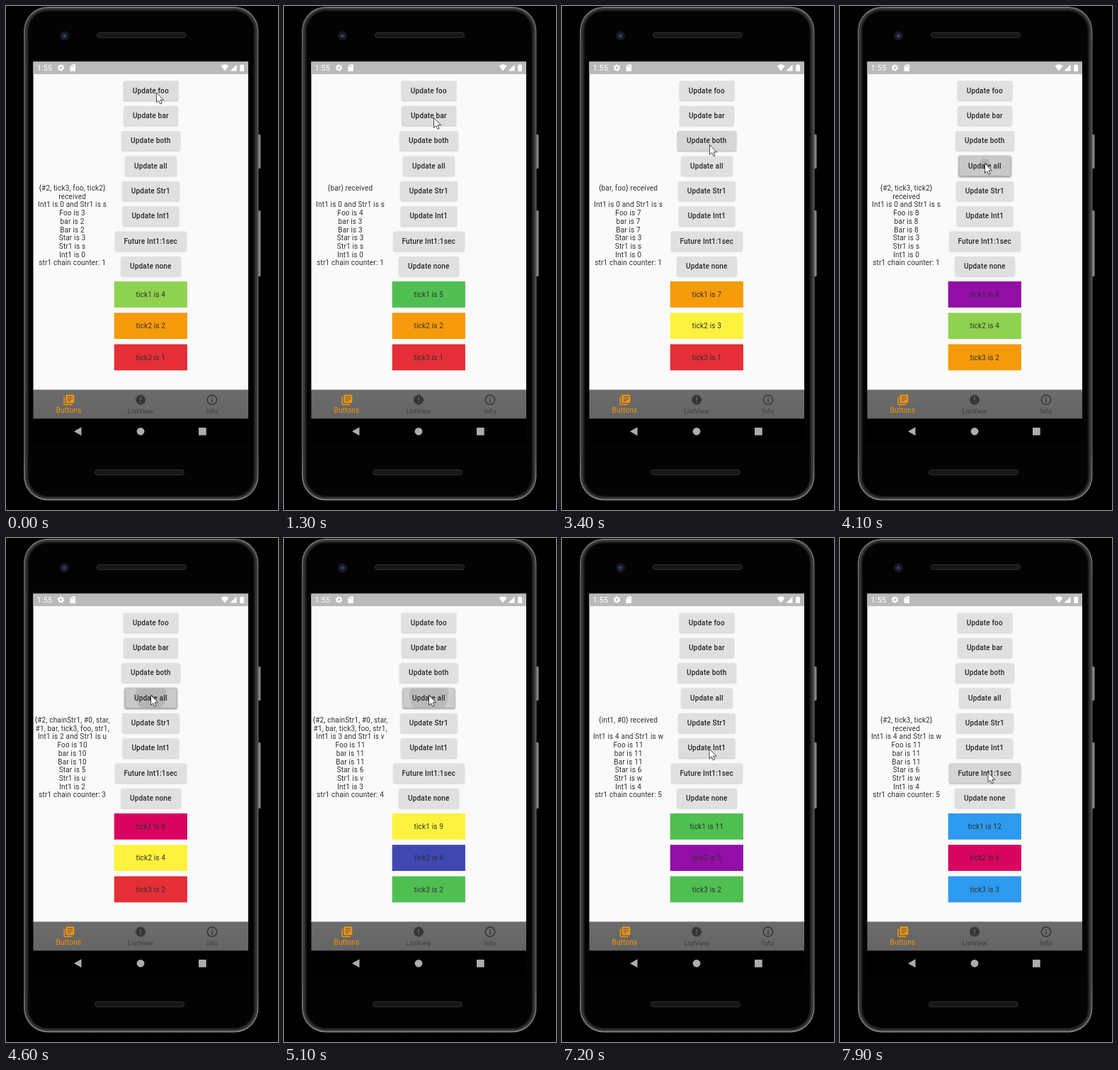
An HTML page for the animation above (8000 ms loop, 384 by 710 pixels).

```html
<!DOCTYPE html>
<html lang="en">
<head>
<meta charset="utf-8">
<title>Update buttons demo</title>
<style>
html, body { margin: 0; width: 100%; height: 100%; overflow: hidden; background: #000; }
svg { display: block; }
text { font: 10px Roboto, sans-serif; letter-spacing: .18px; text-anchor: middle; fill: #303030; }
.label { font-weight: 500; fill: #282828; }
</style>
</head>
<body>
<svg id="stage" width="384" height="710" viewBox="0 0 384 710">
  <defs>
    <linearGradient id="rim" x2="0" y2="1">
      <stop offset="0" stop-color="#707070"/><stop offset=".08" stop-color="#565656"/>
      <stop offset=".9" stop-color="#565656"/><stop offset="1" stop-color="#7c7c7c"/>
    </linearGradient>
    <linearGradient id="tabs" x2="0" y2="1">
      <stop offset="0" stop-color="#6c6c6c"/><stop offset="1" stop-color="#646464"/>
    </linearGradient>
    <radialGradient id="lens">
      <stop offset="0" stop-color="#4a5688"/><stop offset=".4" stop-color="#20263f"/><stop offset="1" stop-color="#0c0d12"/>
    </radialGradient>
    <filter id="soft" x="-20%" y="-40%" width="140%" height="190%"><feGaussianBlur stdDeviation="1"/></filter>
  </defs>
  <rect width="384" height="710" fill="#000"/>
  <g fill="#858585">
    <rect x="354" y="181" width="5.500" height="48" rx="1.500"/>
    <rect x="354" y="288" width="5.500" height="93" rx="1.500"/>
  </g>
  <rect x="25" y="1" width="331.500" height="695.500" rx="34" fill="url(#rim)"/>
  <rect x="27" y="3" width="327.500" height="691.500" rx="32" fill="#333"/>
  <rect x="30" y="5.500" width="321.500" height="686.500" rx="29" fill="#181818"/>
  <rect x="32" y="7.500" width="317.500" height="682.500" rx="27" fill="#030303"/>
  <g fill="#161616" stroke="#303030">
    <rect x="128.500" y="37.500" width="126" height="7" rx="3.500"/>
    <rect x="125.500" y="653.500" width="126" height="7" rx="3.500"/>
  </g>
  <circle cx="82.500" cy="42" r="6" fill="url(#lens)" stroke="#1c1e28"/>

  <rect x="38.500" y="78.500" width="303.500" height="463" fill="#fafafa"/>
  <rect x="38.500" y="78.500" width="303.500" height="17.500" fill="#bababa"/>
  <text x="54.500" y="91" style="font-size:11px;fill:#fff">1:55</text>
  <g fill="#fff">
    <circle cx="77.500" cy="87" r="2.700" fill="none" stroke="#fff" stroke-width="2"/>
    <circle cx="77.500" cy="87" r="4.100" fill="none" stroke="#fff" stroke-width="1.400" stroke-dasharray="2.100 2.190"/>
    <path d="M90.500 85l2.800-2.800h4.700v9.800h-7.500z"/>
    <path d="M92.500 84v2M94.200 83.400v2.600M95.900 83.400v2.600" stroke="#bababa" stroke-width=".7"/>
    <path d="M303.500 84.500q5.500-4.500 11 0l-5.500 7z"/>
    <path d="M316.500 91.500l9-9v9z"/>
    <path d="M330.300 83.300h1.500v-1.100h2.600v1.100h1.500v8.700h-5.600z"/>
  </g>

  <g id="info"></g>
  <g id="buttons"></g>
  <g id="ticks"></g>

  <rect x="38.500" y="540.500" width="303.500" height="41" fill="url(#tabs)"/>
  <g transform="translate(80 546) scale(.74)" fill="#f99200">
    <path d="M4 6H2v14q0 2 2 2h14v-2H4z"/>
    <rect x="6" y="2" width="16" height="16" rx="2"/>
    <path d="M9 6h10M9 10h10M9 14h6" stroke="#686868" stroke-width="2"/>
  </g>
  <circle cx="190" cy="554.700" r="6" fill="#343434" stroke="#343434" stroke-width="2.600" stroke-dasharray="2 1.140"/>
  <path d="M190 551v4.500M190 557v1.500" stroke="#686868" stroke-width="1.500"/>
  <circle cx="291" cy="554.700" r="6.700" fill="none" stroke="#343434" stroke-width="1.400"/>
  <path d="M291 551v1.500M291 554v4.500" stroke="#343434" stroke-width="1.500"/>
  <text x="88.500" y="573" style="fill:#f99200">Buttons</text>
  <text x="190" y="573.500" style="font-size:9px;fill:#3c3c3c">ListView</text>
  <text x="291" y="573.500" style="font-size:9px;fill:#3c3c3c">Info</text>

  <rect x="38.500" y="581.500" width="303.500" height="35" fill="#000"/>
  <g fill="#adadad">
    <path d="M96 599.300l10.500-6v12z"/>
    <circle cx="190" cy="599.300" r="5.400"/>
    <rect x="272" y="594" width="10.700" height="10.700"/>
  </g>
  <path id="cursor" d="M0 0V14L3.200 11.200 5.400 16 7.700 15 5.500 10.300H10Z" fill="#fff" stroke="#333" stroke-width=".9"/>
</svg>
<script>
const LOOP = 8000;
const $ = id => document.getElementById(id);

function add(parent, tag, attrs, text) {
  const el = document.createElementNS("http://www.w3.org/2000/svg", tag);
  for (const k in attrs) el.setAttribute(k, attrs[k]);
  if (text) el.textContent = text;
  parent.appendChild(el);
  return el;
}

const COLORS = {
  l: "#8fd24f", g: "#50bf52", b: "#2d9aef", p: "#920fa7", y: "#fdf23e",
  o: "#f59a0a", r: "#e52e37", i: "#4047b0", k: "#d8045f"
};

// Buttons: name, width
const buttons = [["foo", 77], ["bar", 76], ["both", 82], ["all", 72], ["Str1", 80],
  ["Int1", 79], ["Future Int1:1sec", 100], ["none", 84]].map(([name, w], i) => {
  const g = add($("buttons"), "g", {});
  const y = 105.7 + i * 35.35;
  const box = { x: 204.5 - w / 2, y, width: w, height: 27.4, rx: 1.5 };
  const shadow = add(g, "rect", { ...box, y: y + .8, fill: "#000", stroke: "#000", filter: "url(#soft)" });
  add(g, "rect", { ...box, fill: "#e0e0e0" });
  const shade = add(g, "rect", { ...box, fill: "#000" });
  const clip = add(g, "clipPath", { id: "clip" + i });
  add(clip, "rect", box);
  const ripple = add(g, "circle", { "clip-path": `url(#clip${i})`, fill: "#000", r: 0 });
  add(g, "text", { x: 204.3, y: y + 16.8, class: "label" }, name.length > 5 ? name : "Update " + name);
  return { box, shadow, shade, ripple };
});

const lines = Array.from({ length: 10 }, (_, i) =>
  add($("info"), "text", { x: 93.6, y: 260 + i * 11.72 }));

const ticks = [388, 432.2, 476.5].map(y => ({
  rect: add($("ticks"), "rect", { x: 152.7, y, width: 103.2, height: 36.8 }),
  text: add($("ticks"), "text", { x: 204.3, y: y + 22.2 })
}));

// Presses: button, down, up
const presses = [[0, 180, 300], [1, 880, 1000], [1, 1480, 1600], [2, 2110, 2200], [2, 2350, 2420],
  [2, 2980, 3100], [2, 3380, 3500], [3, 4040, 4180], [3, 4400, 4540], [3, 4850, 4980],
  [4, 5920, 6040], [5, 6820, 6940], [6, 7880, 8100]];

const bump = (...keys) => s => keys.forEach(k => s[k]++);
const ALL = ["{#2, chainStr1, #0, star,", "#1, bar, tick3, foo, str1,"];
const actions = [
  { run: bump("foo"), msg: ["{foo} received"] },
  { run: bump("bar"), msg: ["{bar} received"] },
  { run: bump("foo", "bar"), msg: ["{bar, foo} received"] },
  { run: bump("foo", "bar", "star", "str", "int", "chain"), msg: ALL },
  { run: bump("str", "chain"), msg: ["{chainStr1, #1, str1}", "received"] },
  { run: bump("int"), msg: ["{int1, #0} received"] }
];

// Colours of the three tiles after an event; "." keeps the present one
const allColors = ["obp", "kyr", "yig"];
const tickColors = ["g..", "by.", "o..", "plo", "r..", "lp.", "g..", "bkb"];

const events = presses.filter(p => p[0] < 6).map(([b, , up]) => ({
  t: up, ...actions[b], colors: b === 3 ? allColors.shift() : "..."
}));
tickColors.forEach((colors, i) => {
  const n = i + 5;
  const msg = n % 4 === 0 ? ["{#2, tick3, tick2}", "received"]
    : [n % 2 ? "{#2} received" : "{#2, tick2} received"];
  events.push({ t: 800 + i * 1000, run: bump("tick"), msg, colors });
});
events.sort((a, b) => a.t - b.t);

function stateAt(t) {
  const s = { foo: 3, bar: 2, star: 3, str: 0, int: 0, chain: 1, tick: 4,
    msg: ["{#2, tick3, foo, tick2}", "received"], colors: ["l", "o", "r"] };
  for (const e of events) {
    if (e.t > t) break;
    e.run(s);
    s.msg = e.msg;
    s.colors = s.colors.map((c, i) => e.colors[i] === "." ? c : e.colors[i]);
  }
  return s;
}

// Pointer stops: time, x, y
const path = [[0, 212.5, 122], [400, 212.5, 122], [800, 211.5, 157.5], [1880, 211.5, 157.5],
  [2200, 208.5, 195.5], [3580, 208.5, 195.5], [3900, 204.5, 221.5], [5200, 204.5, 221.5],
  [5650, 207, 262], [6250, 207, 262], [6500, 207.5, 279.5], [6720, 208, 297],
  [7200, 208, 297], [7650, 209, 330], [8000, 209, 330]];

const clamp = v => Math.max(0, Math.min(1, v));

function pointerAt(t) {
  const i = path.findIndex(p => p[0] > t);
  const [t0, x0, y0] = path[i - 1], [t1, x1, y1] = path[i];
  const u = (t - t0) / (t1 - t0), e = u * u * (3 - 2 * u);
  return [x0 + (x1 - x0) * e, y0 + (y1 - y0) * e];
}

function drawButtons(t, x, y) {
  buttons.forEach((b, i) => {
    const over = x > b.box.x && x < b.box.x + b.box.width && y > b.box.y && y < b.box.y + 27.4;
    let glow = 0, radius = 0;
    for (const [n, down, up] of presses) {
      if (n !== i || t < down) continue;
      glow = clamp((t - down) / 60) * clamp(1 - (t - up - 100) / 150);
      radius = Math.min(60, (t - down) * .11);
    }
    b.shade.setAttribute("opacity", (over ? .012 : 0) + glow * .09);
    b.shadow.setAttribute("opacity", .2 + (over ? .05 : 0) + glow * .15);
    b.shadow.setAttribute("stroke-width", glow * 2.5);
    b.ripple.setAttribute("r", glow ? radius : 0);
    b.ripple.setAttribute("opacity", glow * .1);
    b.ripple.setAttribute("cx", x);
    b.ripple.setAttribute("cy", y);
  });
}

function draw(t) {
  const s = stateAt(t);
  const str = "stuvw"[s.str];
  [s.msg[0], s.msg[1] || "", `Int1 is ${s.int} and Str1 is ${str}`, `Foo is ${s.foo}`,
    `bar is ${s.bar}`, `Bar is ${s.bar}`, `Star is ${s.star}`, `Str1 is ${str}`,
    `Int1 is ${s.int}`, `str1 chain counter: ${s.chain}`
  ].forEach((line, i) => { lines[i].textContent = line; });
  ticks.forEach((tile, i) => {
    tile.rect.setAttribute("fill", COLORS[s.colors[i]]);
    tile.text.textContent = `tick${i + 1} is ${s.tick >> i}`;
  });
  const [x, y] = pointerAt(t);
  drawButtons(t, x, y);
  $("cursor").setAttribute("transform", `translate(${x} ${y})`);
}

const start = performance.now();
function frame() {
  draw((performance.now() - start) % LOOP);
  requestAnimationFrame(frame);
}
frame();
</script>
</body>
</html>
```
